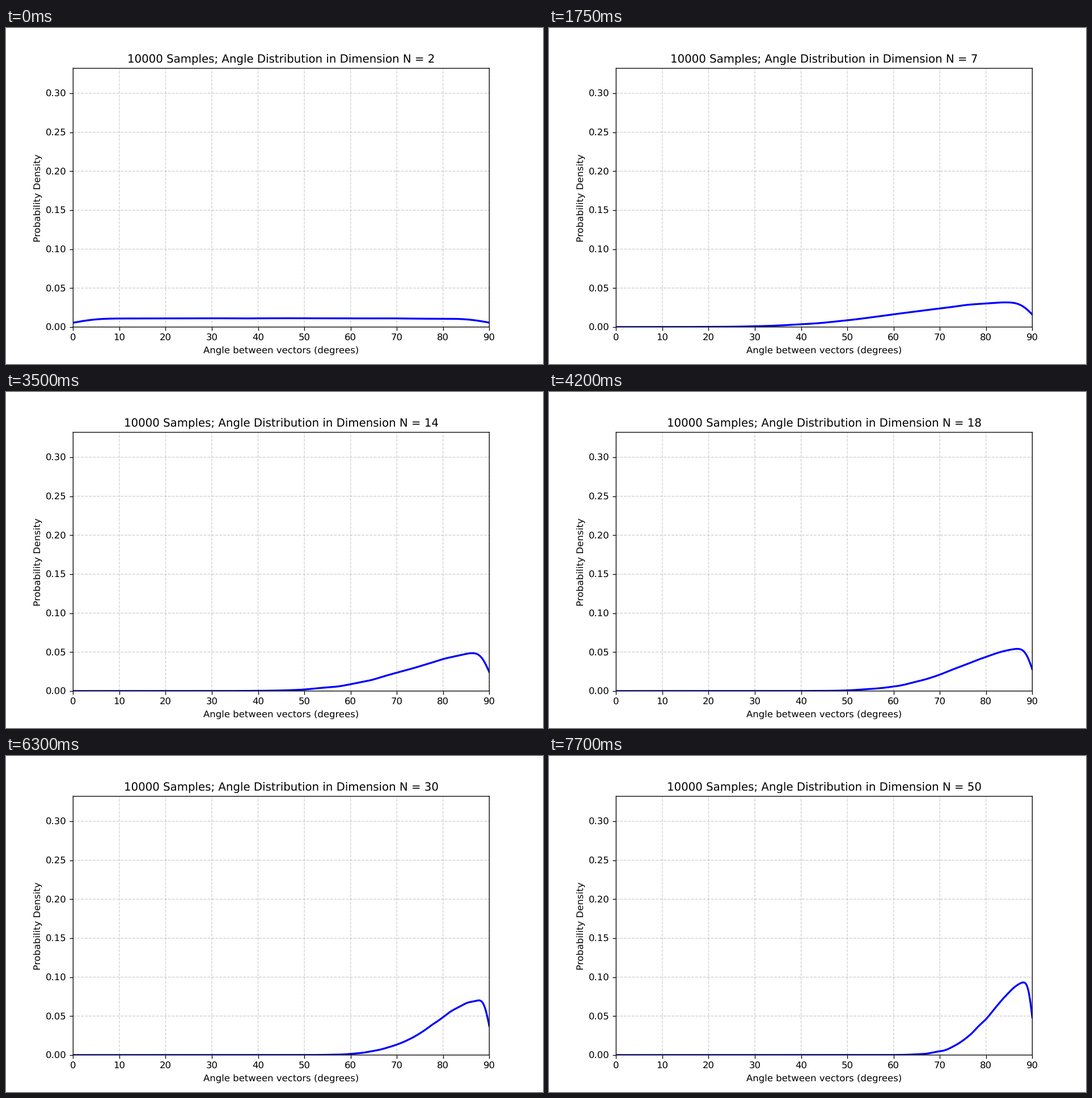
Recreate the animation shown at these times as a matplotlib script. Size 947 px wide and 592 px high, loop 8 s.

```python
import numpy as np
import matplotlib.pyplot as plt
from matplotlib.animation import FuncAnimation

DPI = 118.375
WIDTH, HEIGHT = 947, 592
TICK_MS = 50
HOLD = 7  # ticks per dimension
TICKS = 160
SAMPLES = 10000
DRAWS = 3 * SAMPLES  # extra draws keep the ripples gentle

DIMS = [*range(2, 10), *range(10, 31, 2), *range(35, 51, 5)]

# Unsnapped lines and unhinted text sit at their exact positions
plt.rcParams.update({"path.snap": False, "text.hinting": "none"})

angles = np.linspace(0, 90, 500)
cells = (np.arange(1800) + 0.5) / 20


def density_curve(dim):
    """Kernel density estimate of the acute angle between random vectors."""
    weight = np.sin(np.radians(cells)) ** (dim - 2)
    weight /= weight.sum()
    spread = np.sqrt(weight @ cells ** 2 - (weight @ cells) ** 2)
    bandwidth = spread * SAMPLES ** -0.2

    rng = np.random.default_rng(dim)
    share = rng.multinomial(DRAWS, weight) / DRAWS
    kernel = np.exp(-0.5 * ((angles[:, None] - cells) / bandwidth) ** 2)
    return kernel @ share / (bandwidth * np.sqrt(2 * np.pi))


curves = [density_curve(dim) for dim in DIMS]

fig, ax = plt.subplots(
    figsize=(WIDTH / DPI, (HEIGHT + 1e-6) / DPI), dpi=DPI)
line, = ax.plot(angles, curves[0], color="blue", lw=2)
ax.set_xlim(0, 90)
ax.set_ylim(0, 0.332)
ax.set_xlabel("Angle between vectors (degrees)")
ax.set_ylabel("Probability Density")
ax.grid(True, linestyle="--", alpha=0.6)
title = ax.set_title("")


def update(tick):
    step = min(tick // HOLD, len(DIMS) - 1)
    line.set_ydata(curves[step])
    title.set_text(f"{SAMPLES} Samples; Angle Distribution "
                   f"in Dimension N = {DIMS[step]}")
    return line, title


anim = FuncAnimation(fig, update, frames=TICKS, interval=TICK_MS,
                     repeat=True, repeat_delay=0)
plt.show()
```
